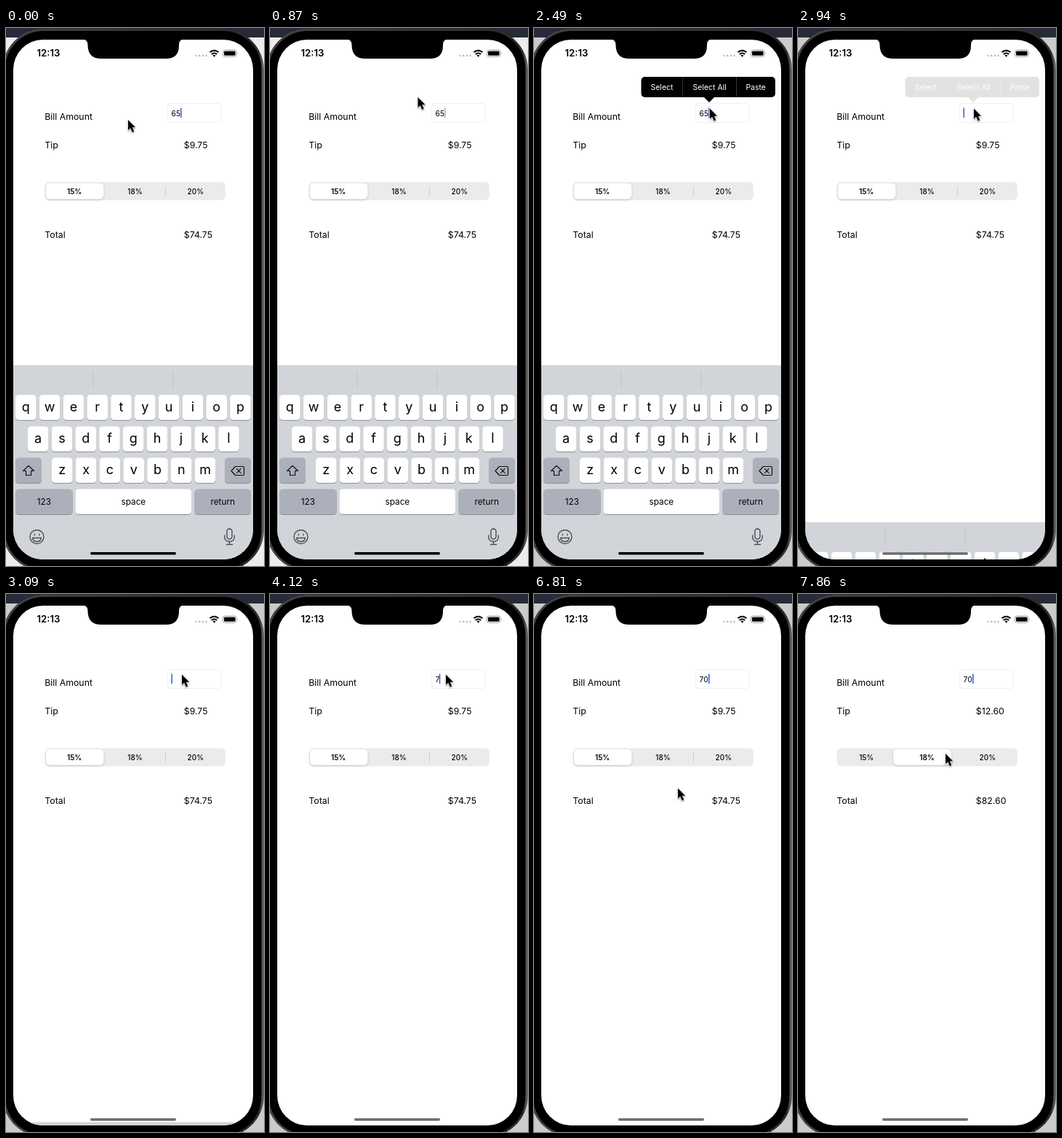
An HTML page for the animation above (8000 ms loop, 355 by 738 pixels).

```html
<!DOCTYPE html>
<html lang="en">
<head>
<meta charset="utf-8">
<title>Tip calculator</title>
<style>
  html, body { margin: 0; height: 100%; overflow: hidden; }
  svg { display: block; width: 100vw; height: 100vh; font-family: Inter, Roboto, sans-serif; }
  .label { font-size: 12.3px; }
  .mid { text-anchor: middle; }
  .seg { font-size: 10px; font-weight: 500; }
  .menu { font-size: 10.5px; fill: #fff; }
  .letter { font-size: 18px; }
  .word { font-size: 11.8px; }
  .line { fill: none; stroke: #4b4e54; stroke-width: 1.4; stroke-linecap: round; stroke-linejoin: round; }
</style>
</head>
<body>
<svg viewBox="0 0 355 738" preserveAspectRatio="none">
  <defs>
    <clipPath id="screen"><rect x="10" y="16" width="330" height="713" rx="41"/></clipPath>
    <linearGradient id="homeFade" x2="0" y2="1">
      <stop stop-color="#8c8c8c"/><stop offset="1" stop-color="#505050"/>
    </linearGradient>
    <linearGradient id="rim">
      <stop stop-color="#444"/><stop offset=".98" stop-color="#2a2a2a"/><stop offset="1" stop-color="#6a6a6a"/>
    </linearGradient>
  </defs>

  <rect id="desk" width="355" height="738"/>
  <rect width="355" height="13" fill="#272a38"/>
  <rect x="-5" y="1" width="360" height="744" rx="57" fill="url(#rim)"/>
  <rect x="-1.5" y="4" width="353" height="738" rx="53" fill="#000"/>

  <g clip-path="url(#screen)">
    <rect x="10" y="16" width="330" height="713" fill="#fff"/>
    <path d="M105 15Q112.500 16 112.500 23V24Q113 42 131 42H220Q238 42 238 24V23Q238 16 245 15Z"/>

    <text x="42.500" y="39" font-size="13.200" font-weight="600">12:13</text>
    <path d="M261.500 38h15" stroke="#b9b9b9" stroke-width="2.600" stroke-linecap="round" stroke-dasharray="0 4.700"/>
    <g fill="none" stroke="#000" stroke-width="2">
      <path d="M280.500 33.200Q286.500 28.500 292.500 33.200M282.700 36Q286.500 33 290.300 36"/>
    </g>
    <path d="M284.400 37.600Q286.500 36 288.600 37.600L286.500 39.800Z"/>
    <rect x="298.500" y="30.300" width="18.500" height="9" rx="2.700" fill="none" stroke="#999"/>
    <rect x="300" y="31.800" width="15.500" height="6" rx="1.400"/>
    <path d="M318.300 33.300q1.300 1.500 0 3Z" fill="#999"/>

    <g class="label">
      <text x="53.300" y="126">Bill Amount</text>
      <text x="53.300" y="164.500">Tip</text>
      <text x="53.300" y="287.500">Total</text>
      <text id="tip" x="244.800" y="164.500"></text>
      <text id="total" x="244.800" y="287.500"></text>
    </g>

    <rect x="222.500" y="103.500" width="74" height="26" rx="4" fill="#fff" stroke="#efefef"/>
    <text id="bill" x="227.500" y="120.500" font-size="10.300"></text>
    <rect id="caret" y="109.300" width="1.600" height="14" rx=".8" fill="#3f67d8"/>

    <rect x="53.500" y="211.500" width="248.500" height="24.700" rx="6.500" fill="#ebebec"/>
    <path id="divider" d="M219.500 217v14" stroke="#d0d0d2"/>
    <rect id="thumb" y="213" width="79.700" height="21.800" rx="5.500" fill="#fff"
      style="filter:drop-shadow(0 1px 1.5px #0003)"/>
    <g id="segments"></g>

    <g id="menu">
      <path d="M152.500 67H327a5 5 0 0 1 5 5V90a5 5 0 0 1-5 5H248L241 102L234 95H152.500a5 5 0 0 1-5-5V72a5 5 0 0 1 5-5Z"/>
      <path d="M204.500 67v28M278.500 67v28" stroke="#333"/>
    </g>

    <g id="keyboard">
      <rect x="10" y="462.500" width="330" height="276" fill="#d1d4d9"/>
      <path d="M120 472v21M230 472v21" stroke="#bcc0c6"/>
      <g id="keys"></g>
      <path class="line" style="stroke:#111;stroke-width:1.200" d="M31 600.500L38.500 607.500H34.500V613.500H27.500V607.500H23.500Z"/>
      <path class="line" style="stroke:#111;stroke-width:1.200" d="M310 607.500L315.500 601.500H326q1.500 0 1.500 1.500V612q0 1.500-1.500 1.500H315.500ZM317.500 604.700l5.600 5.600m0-5.600l-5.600 5.600"/>
      <circle class="line" cx="42.500" cy="698" r="9.500"/>
      <path class="line" d="M39.300 694.300v1.400M45.700 694.300v1.400M36.500 699.500H48.500Q47.500 704.500 42.500 704.500T36.500 699.500Z"/>
      <rect class="line" x="304" y="687" width="7" height="14" rx="3.500"/>
      <path class="line" d="M300.800 696v2q0 6.500 6.700 6.500t6.700-6.500v-2M307.500 704.500v4M303.500 708.500h8"/>
    </g>
    <rect id="home" x="116" y="719" width="118" height="3.500" rx="1.750"/>
  </g>

  <path id="cursor" d="M0 0V14.200L3.200 11.200L5.700 17L8.300 15.900L5.900 10.300H10.200Z" stroke="#fff" stroke-width="1.200"
    paint-order="stroke" style="filter:drop-shadow(0 1px 1px #0006)"/>
</svg>

<script>
const $ = id => document.getElementById(id);
const text = (x, y, cls, s) => `<text x="${x}" y="${y}" class="mid ${cls}">${s}</text>`;

// Static parts built from short rules
const key = (x, y, w, label, cls, fill = '#fff') =>
  `<rect x="${x}" y="${y + 1}" width="${w}" height="34.500" rx="4.500" fill="#8c8f95"/>
   <rect x="${x}" y="${y}" width="${w}" height="34.500" rx="4.500" fill="${fill}"/>` +
  text(x + w / 2, y + (cls === 'letter' ? 22.5 : 21), cls, label);
const letterRow = (letters, x, y) =>
  [...letters].map((c, i) => key(x + i * 32.8, y, 28.6, c, 'letter')).join('');
const grey = '#abb0ba';

$('keys').innerHTML =
  letterRow('qwertyuiop', 13, 503.3) + letterRow('asdfghjkl', 29.8, 546.5) + letterRow('zxcvbnm', 63, 589.6) +
  key(13, 589.6, 36, '', 'word', grey) + key(301, 589.6, 36, '', 'word', grey) +
  key(13, 632.6, 78.7, '123', 'word', grey) + key(95.500, 632.6, 159.7, 'space', 'word') +
  key(259.5, 632.6, 77.5, 'return', 'word', grey);
$('segments').innerHTML = ['15%', '18%', '20%'].map((s, i) => text(94.2 + i * 83.3, 227.6, 'seg', s)).join('');
$('menu').innerHTML += text(176, 85, 'menu', 'Select') + text(241.7, 85, 'menu', 'Select All') + text(305.2, 85, 'menu', 'Paste');

const LOOP = 8000, STEP = 148.5, LEAD = 38;
const cursorPath = [
  [0, 168, 126], [2, 140, 132], [3, 119, 118], [4, 138, 95], [5, 175, 86], [7, 232, 104], [8, 239, 110],
  [11, 238.5, 110.5], [13, 242, 110.5], [39, 242, 110.5], [40, 235, 135], [42, 105, 315], [43, 69, 366],
  [44, 105, 338], [46, 198, 266.5], [50, 203, 219], [54, 203, 219],
];
const caretResets = [0, 10, 20, 27, 30];

function cursorAt(n) {
  const i = cursorPath.findIndex(k => k[0] > n);
  if (i < 0) return cursorPath.at(-1).slice(1);
  const [a, ax, ay] = cursorPath[i - 1], [b, bx, by] = cursorPath[i];
  const p = (n - a) / (b - a);
  return [ax + (bx - ax) * p, ay + (by - ay) * p];
}

function caretOpacity(n) {
  const phase = (n - caretResets.findLast(r => r <= n)) % 7;
  return phase < 4 ? 1 : phase < 6 ? 0 : 0.5;
}

function render(n) {
  const set = (id, name, value) => $(id).setAttribute(name, value);
  const bill = n < 20 ? '65' : n < 27 ? '' : n < 30 ? '7' : '70';
  const picked = n >= 52 ? 1 : 0;

  set('desk', 'fill', n < 9 ? '#ececec' : '#cbcbcb');
  set('cursor', 'transform', `translate(${cursorAt(n)})`);
  $('bill').textContent = bill;
  set('caret', 'x', [227.4, 232.7, 240][bill.length]);
  set('caret', 'opacity', caretOpacity(n));

  set('menu', 'opacity', n < 13 || n > 20 ? 0 : n === 13 ? 0.5 : n === 20 ? 0.11 : 1);
  set('keyboard', 'transform', `translate(0 ${n < 20 ? 0 : n === 20 ? 215.5 : n === 21 ? 262 : 280})`);
  set('home', 'fill', n < 20 ? '#000' : 'url(#homeFade)');

  $('tip').textContent = picked ? '$12.60' : '$9.75';
  $('total').textContent = picked ? '$82.60' : '$74.75';
  set('thumb', 'x', [85, 131.3, 137.8][n - 52] ?? 54.8);
  set('divider', 'opacity', 1 - picked);
  [...$('segments').children].forEach((s, i) => s.style.fontWeight = i === picked ? 600 : 500);
}

function tick() {
  render(Math.floor((performance.now() % LOOP + LEAD) / STEP));
  requestAnimationFrame(tick);
}
tick();
</script>
</body>
</html>
```
